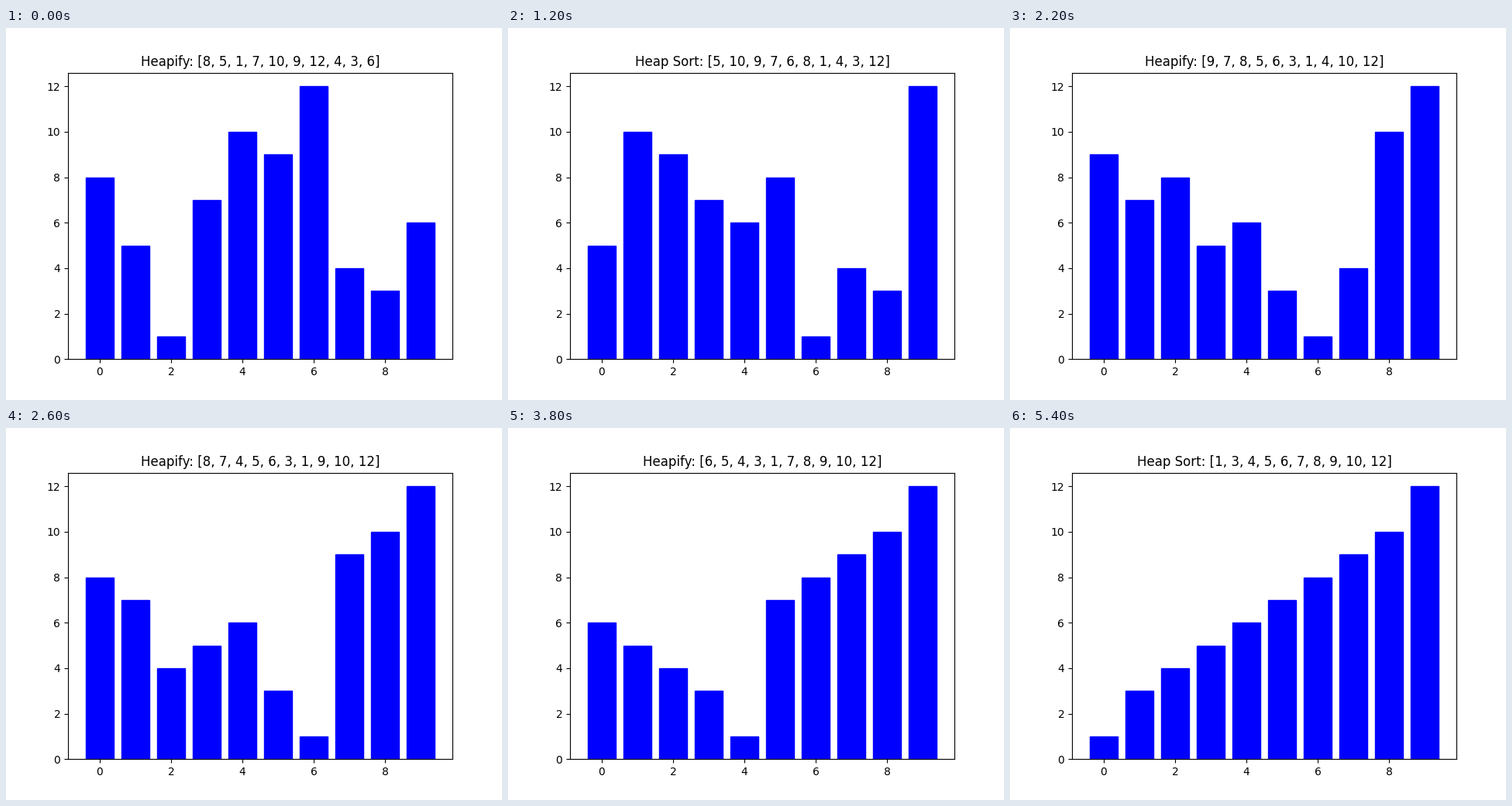
Animation, 640 px wide and 480 px high, one loop 5.6 s. Source, as a matplotlib script:

```python
import matplotlib.pyplot as plt
from matplotlib.animation import FuncAnimation

VALUES = [8, 5, 1, 7, 10, 9, 12, 4, 3, 6]
STEP_MS = 200


def sift_down(a, n, i):
    """Restore the heap below i, yielding after every swap."""
    while True:
        kids = [k for k in (2 * i + 1, 2 * i + 2) if k < n]
        top = max([i] + kids, key=lambda k: a[k])
        if top == i:
            return
        a[i], a[top] = a[top], a[i]
        yield "Heapify", a[:]
        i = top


def heap_sort(values):
    a = values[:]
    n = len(a)
    yield "Heapify", a[:]
    for i in range(n // 2 - 1, -1, -1):
        yield from sift_down(a, n, i)
    for end in range(n - 1, 0, -1):
        a[0], a[end] = a[end], a[0]
        yield "Heap Sort", a[:]
        yield from sift_down(a, end, 0)


steps = list(heap_sort(VALUES))

fig, ax = plt.subplots(figsize=(6.4, 4.8), dpi=100)
bars = ax.bar(range(len(VALUES)), VALUES, color="blue", edgecolor="blue", linewidth=1)


def draw(k):
    label, state = steps[k]
    for bar, value in zip(bars, state):
        bar.set_height(value)
    title = ax.set_title(f"{label}: {state}")
    return [*bars, title]


anim = FuncAnimation(fig, draw, frames=len(steps), interval=STEP_MS,
                     init_func=lambda: draw(0), repeat=True, repeat_delay=0)
plt.show()
```
